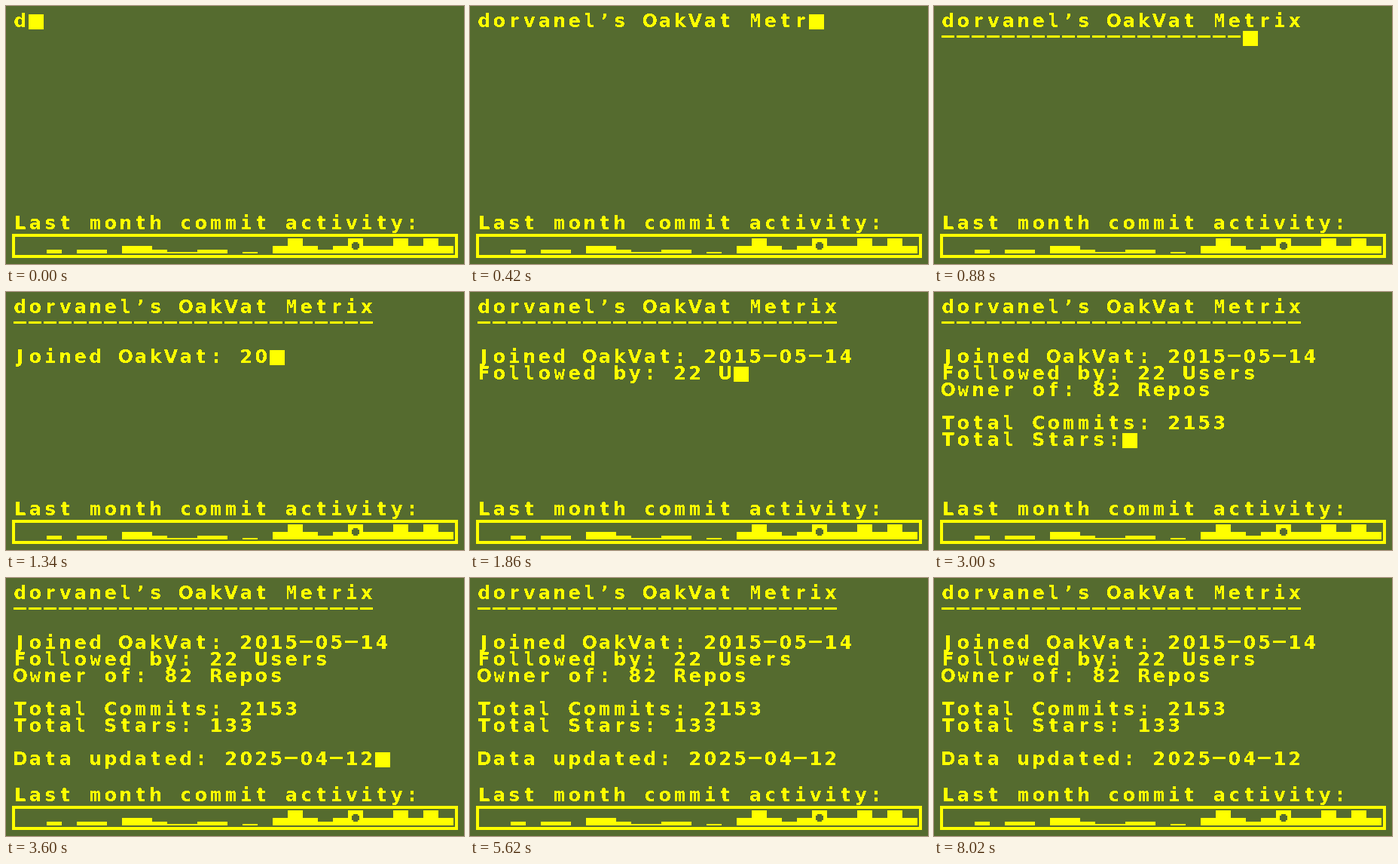
An HTML page that plays this animation: 608x342 px, repeating every 8420 ms.

```html
<!DOCTYPE html>
<html lang="en">
<head>
<meta charset="utf-8">
<title>Metrix terminal</title>
<style>
  html, body { margin: 0; width: 100%; height: 100%; overflow: hidden; background: #556b2f; }
  #stage { position: relative; width: 608px; height: 342px; overflow: hidden; background: #556b2f; color: #ff0; }
  #type { position: absolute; inset: 0; filter: url(#hard); }
  .cell {
    position: absolute; display: flex; justify-content: center;
    width: 17.5px; margin-top: -2px; white-space: pre;
    font: bold 24px/22px "DejaVu Sans", sans-serif;
  }
  .mono { font-family: "DejaVu Sans Mono", monospace; }
  .dash { width: 17px; height: 3px; margin-top: 6px; background: #ff0; font-size: 0; line-height: 0; }
  #caret { position: absolute; width: 20px; height: 20px; background: #ff0; }
  svg { position: absolute; left: 0; top: 0; }
</style>
</head>
<body>
<div id="stage">
  <svg width="608" height="342" shape-rendering="crispEdges">
    <!-- Turns soft glyph edges into hard ones -->
    <filter id="hard" filterUnits="userSpaceOnUse" x="0" y="0" width="608" height="342"
            color-interpolation-filters="sRGB">
      <feComponentTransfer><feFuncA type="discrete" tableValues="0 1"/></feComponentTransfer>
    </filter>
    <rect x="10" y="304" width="588" height="28" fill="none" stroke="#ff0" stroke-width="4"/>
    <path id="bars" fill="#ff0"/>
    <path d="M459 315h10v6h-10zM461 313h6v10h-6z" fill="#556b2f"/>
  </svg>
  <div id="type"></div>
  <div id="caret"></div>
</div>
<script>
  const $ = id => document.getElementById(id);
  const LOOP = 8420, STEP = 20, BLINK = 400, CELL = 20, LINE = 22, LEFT = 10, TOP = 11;

  const text = [
    "dorvanel’s OakVat Metrix",
    "-".repeat(24),
    "",
    "Joined OakVat: 2015-05-14",
    "Followed by: 22 Users",
    "Owner of: 82 Repos",
    "",
    "Total Commits: 2153",
    "Total Stars: 133",
    "",
    "Data updated: 2025-04-12"
  ].join("\n");
  const typedAt = text.length * STEP;

  // One digit per day: bar height in eighths of a cell
  const days = "00202204421122010484248448484";
  $("bars").setAttribute("d", [...days].map((d, i) => {
    const h = Math.floor(d * 2.5);
    return `M${14 + i * CELL} ${328 - h}h${CELL}v${h}h-${CELL}z`;
  }).join(""));

  // Puts an element where the n-th character of a string goes
  function place(el, str, n, top) {
    const lines = str.slice(0, n).split("\n");
    el.style.left = LEFT + lines.at(-1).length * CELL + "px";
    el.style.top = top + (lines.length - 1) * LINE + "px";
  }

  // Very narrow and very wide letters use the monospaced face
  function addText(str, top) {
    return [...str].map((ch, i) => {
      const el = document.createElement("span");
      el.className = "cell" + (ch === "-" ? " dash" : /[ijlmwM]/.test(ch) ? " mono" : "");
      el.textContent = ch.trim();
      place(el, str, i, top);
      $("type").append(el);
      return el;
    });
  }

  const cells = addText(text, TOP);
  addText("Last month commit activity:", 279);

  let shown = -1;
  function draw(t) {
    const n = Math.min(text.length, Math.floor(t / STEP) + 1);
    if (n !== shown) {
      shown = n;
      cells.forEach((el, i) => el.style.visibility = i < n ? "visible" : "hidden");
      place($("caret"), text, n, TOP);
    }
    const on = t < typedAt || Math.floor((t - typedAt) / BLINK) % 2 === 0;
    $("caret").style.visibility = on ? "visible" : "hidden";
  }

  const start = performance.now();
  function tick() {
    draw((performance.now() - start) % LOOP);
    requestAnimationFrame(tick);
  }
  draw(0);
  requestAnimationFrame(tick);
</script>
</body>
</html>
```
